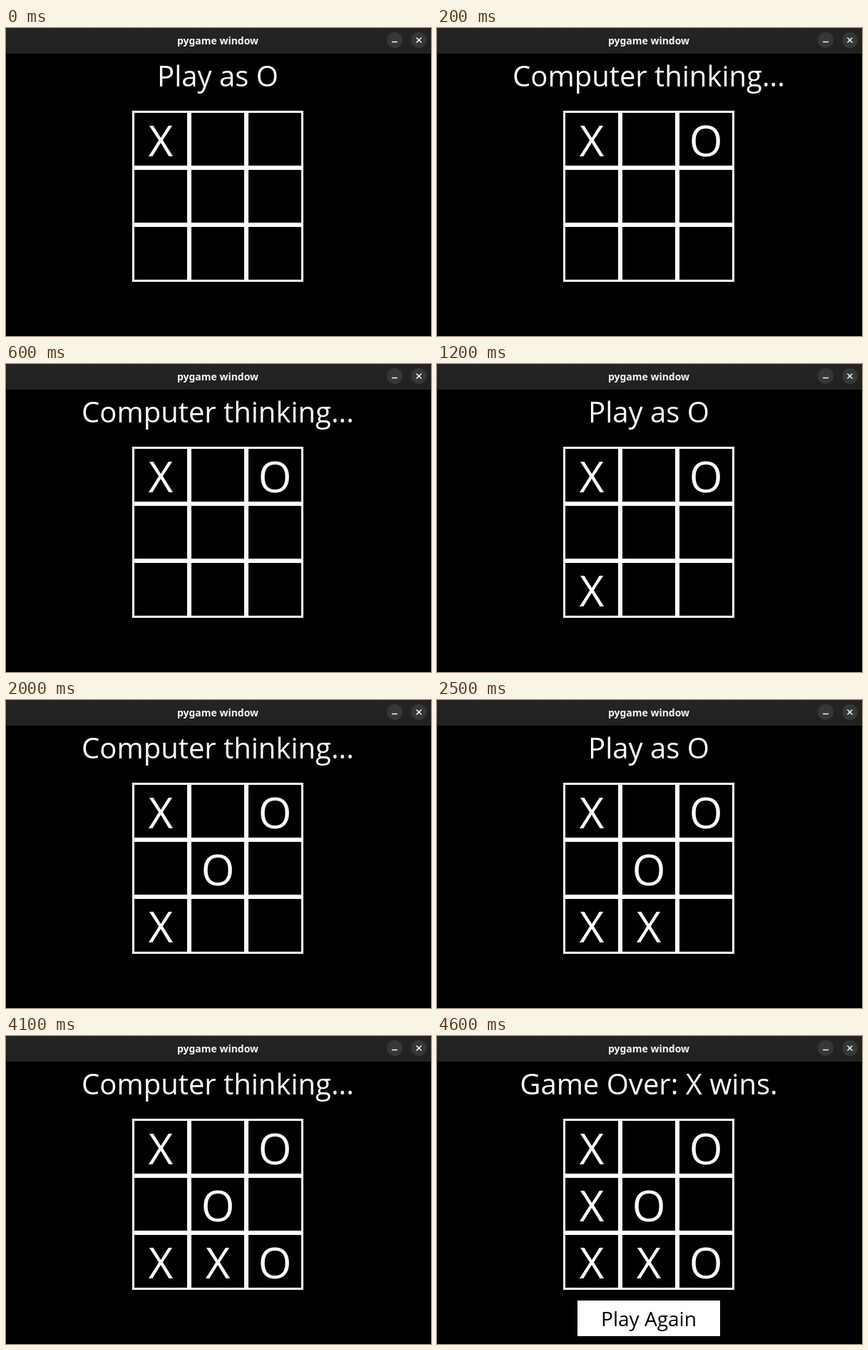
Write an HTML page that moves like this. It is 596x432 px and loops after 5.5 s.

```html
<!DOCTYPE html>
<html lang="en">
<head>
<meta charset="utf-8">
<title>Tic-tac-toe</title>
<style>
  html, body { margin: 0; width: 100%; height: 100%; overflow: hidden; background: #000; }
  svg { display: block; width: 100%; height: 100%; }
  text { font-family: "Open Sans", sans-serif; text-anchor: middle; fill: #fff; }
  .caption { font: 700 14px "Noto Sans", sans-serif; fill: #f7f7f7; }
  .status { font-size: 40px; }
  .mark { font-size: 60px; }
  .again { font-size: 28px; fill: #000; }
  .icon { stroke: #f7f7f7; stroke-width: 1.5; fill: none; }
</style>
</head>
<body>
<svg viewBox="0 0 596 432">
  <defs>
    <linearGradient id="bar" x2="0" y2="1">
      <stop stop-color="#252525"/>
      <stop offset="1" stop-color="#202020"/>
    </linearGradient>
  </defs>
  <rect width="596" height="432"/>
  <path d="M-3 36V7Q-3-1 5-1H589Q597-1 597 7V36Z" fill="url(#bar)"/>
  <text class="caption" x="297" y="23">pygame window</text>
  <g fill="#373737">
    <circle cx="545" cy="17" r="11"/>
    <circle cx="579" cy="17" r="11"/>
  </g>
  <path class="icon" d="M541 19.5H549M575.5 13.5L582.5 20.5M582.5 13.5L575.5 20.5"/>
  <text class="status" id="status" x="297" y="82"></text>
  <g id="board"></g>
  <g id="button">
    <rect x="197" y="371" width="200" height="50" fill="#fff"/>
    <text class="again" x="297" y="407">Play Again</text>
  </g>
</svg>
<script>
const LOOP = 5500, TILE = 80, LEFT = 177, TOP = 116;
const PLAY = "Play as O", THINK = "Computer thinking...", OVER = "Game Over: X wins.";

// Each move: start time, cell index, player, status shown afterwards
const moves = [
  [0, 0, "X", PLAY],
  [100, 2, "O", THINK],
  [1200, 6, "X", PLAY],
  [2000, 4, "O", THINK],
  [2500, 7, "X", PLAY],
  [4100, 8, "O", THINK],
  [4600, 3, "X", OVER]
];

const byId = id => document.getElementById(id);
const board = byId("board"), status = byId("status"), button = byId("button");

function add(tag, attrs) {
  const el = document.createElementNS("http://www.w3.org/2000/svg", tag);
  for (const key in attrs) el.setAttribute(key, attrs[key]);
  return board.appendChild(el);
}

const cells = Array.from({ length: 9 }, (_, i) => {
  const x = LEFT + (i % 3) * TILE, y = TOP + Math.floor(i / 3) * TILE;
  add("rect", {
    x: x + 1.5, y: y + 1.5, width: TILE - 3, height: TILE - 3,
    fill: "none", stroke: "#fff", "stroke-width": 3
  });
  return add("text", { class: "mark", x: x + TILE / 2, y: y + 64 });
});

let shown = 0;

function render(t) {
  const count = moves.filter(([start]) => t >= start).length;
  if (count === shown) return;
  shown = count;
  const marks = Array(9).fill("");
  for (const [, cell, player] of moves.slice(0, count)) marks[cell] = player;
  cells.forEach((el, i) => { el.textContent = marks[i]; });
  status.textContent = moves[count - 1][3];
  button.style.display = count === moves.length ? "" : "none";
}

const begin = performance.now();

function tick() {
  render((performance.now() - begin) % LOOP);
  requestAnimationFrame(tick);
}
tick();
</script>
</body>
</html>
```
